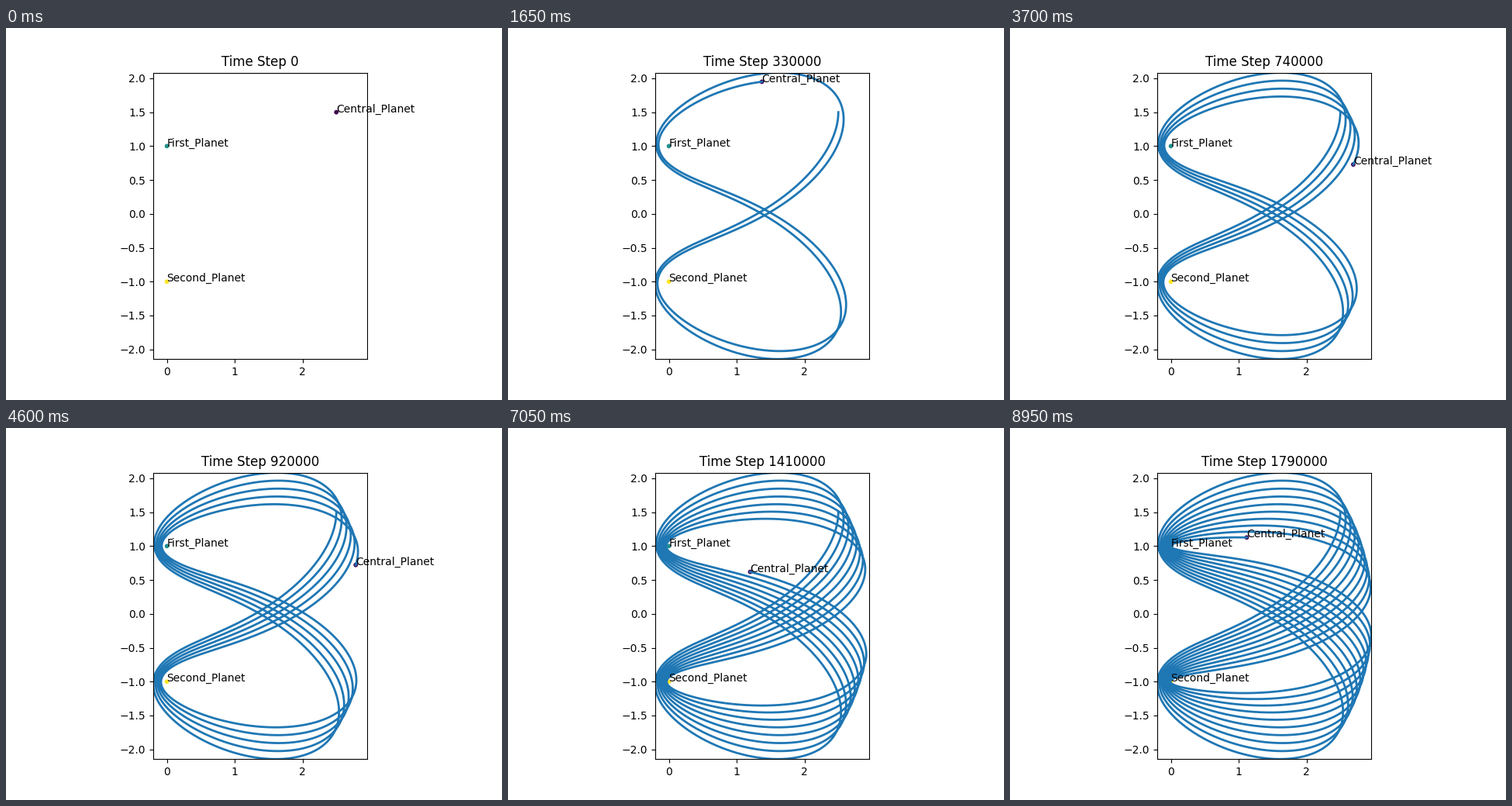
Animation of 640 by 480 pixels, one loop 9000 ms. Source, as a matplotlib script:

```python
import math

import matplotlib.pyplot as plt
import numpy as np
from matplotlib.animation import FuncAnimation

FRAMES = 180
STEPS_PER_FRAME = 10000      # counted in the title
SUB = 400                    # trail points per frame
H = 0.002                    # step of the stretched time

SUNS = ((0.0, 1.0), (0.0, -1.0))
X0, Y0, SPEED = 2.5, 1.5, 0.4     # moving straight down at first


def deriv(s, energy):
    """Two unit masses in elliptic coordinates, where both axes separate."""
    m, n, pm, pn, _ = s
    return (pm, pn,
            energy * math.sinh(2 * m) + 2 * math.sinh(m),
            -energy * math.sin(2 * n),
            math.cosh(m) ** 2 - math.sin(n) ** 2)


def shift(s, d, h):
    return [p + h * q for p, q in zip(s, d)]


def rk4(s, h, energy):
    a = deriv(s, energy)
    b = deriv(shift(s, a, h / 2), energy)
    c = deriv(shift(s, b, h / 2), energy)
    d = deriv(shift(s, c, h), energy)
    mean = [(p + 2 * q + 2 * r + t) / 6 for p, q, r, t in zip(a, b, c, d)]
    return shift(s, mean, h)


def orbit():
    """Positions at even times, SUB of them per frame."""
    r1, r2 = (math.hypot(X0 - sx, Y0 - sy) for sx, sy in SUNS)
    energy = SPEED ** 2 / 2 - 1 / r1 - 1 / r2
    m = math.acosh((r1 + r2) / 2)
    n = math.asin((r2 - r1) / 2)
    s = [m, n, -SPEED * math.sinh(m) * math.sin(n),
         -SPEED * math.cosh(m) * math.cos(n), 0.0]
    track = [s]
    while s[4] < FRAMES:
        s = rk4(s, H, energy)
        track.append(s)
    m, n, _, _, t = np.array(track).T
    even = np.linspace(0, FRAMES, FRAMES * SUB + 1)
    m, n = np.interp(even, t, m), np.interp(even, t, n)
    return np.column_stack([np.sinh(m) * np.cos(n), np.cosh(m) * np.sin(n)])


path = orbit()

plt.rcParams["font.family"] = "DejaVu Sans"
fig, ax = plt.subplots(figsize=(6.4, 4.8), dpi=100)
ax.set_aspect("equal")
ax.set_xlim(path[:, 0].min(), path[:, 0].max())
ax.set_ylim(path[:, 1].min(), path[:, 1].max())
ax.set_xticks([0, 1, 2])
ax.set_yticks(np.arange(-2, 2.1, 0.5))

title = ax.set_title("Time Step 0")
trail, = ax.plot([], [], lw=2, color="C0")
bodies = np.array([(X0, Y0), *SUNS])
dots = ax.scatter(bodies[:, 0], bodies[:, 1], s=10, c=[0, 1, 2],
                  cmap="viridis", zorder=1)
names = ("Central_Planet", "First_Planet", "Second_Planet")
labels = [ax.text(x, y, name) for (x, y), name in zip(bodies, names)]


def update(i):
    end = i * SUB
    pos = path[end]
    seen = path[:end + 1] if i else path[:0]
    trail.set_data(seen[:, 0], seen[:, 1])
    dots.set_offsets([pos, *SUNS])
    labels[0].set_position(pos)
    title.set_text(f"Time Step {i * STEPS_PER_FRAME}")
    return trail, dots, labels[0], title


anim = FuncAnimation(fig, update, frames=FRAMES, interval=50,
                     init_func=lambda: update(0), repeat=True,
                     repeat_delay=0, blit=False)
plt.show()
```
